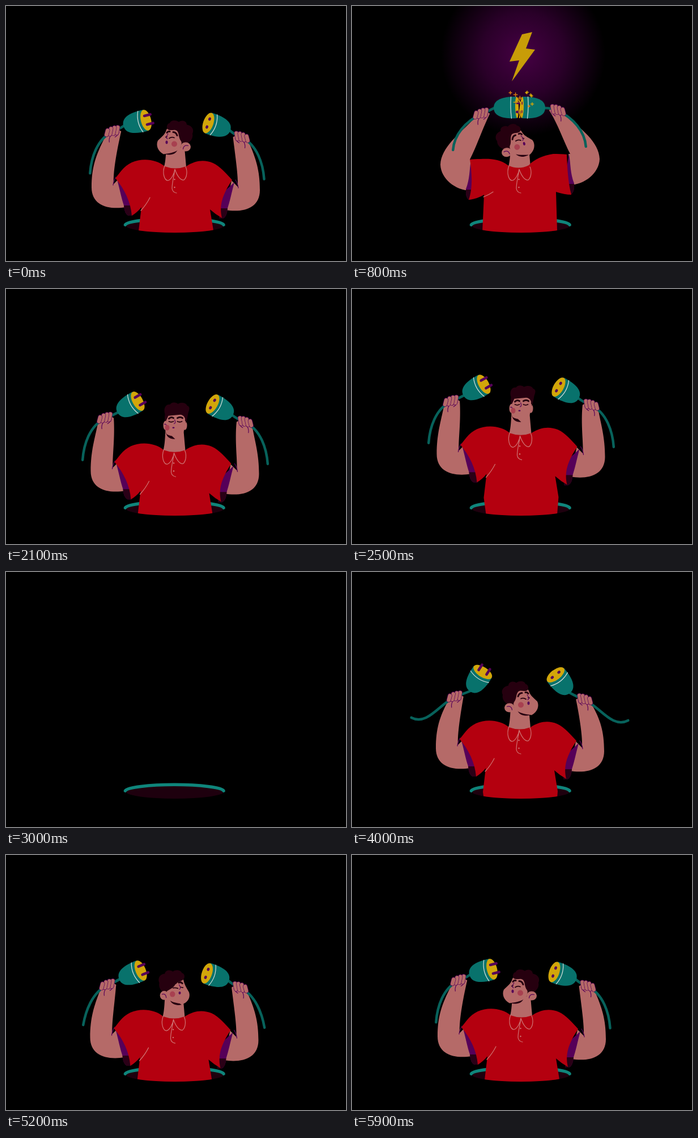
Animation of 600x450 px, one loop 6 s. Source, as an HTML page with a canvas:

```html
<!DOCTYPE html>
<html lang="en">
<head>
<meta charset="utf-8">
<title>Plugging in</title>
<style>
  html, body { margin: 0; width: 100%; height: 100%; overflow: hidden; background: #000; }
  canvas { display: block; }
</style>
</head>
<body>
<canvas id="stage" width="600" height="450"></canvas>
<script>
const ctx = document.getElementById('stage').getContext('2d');
const LOOP = 6000, STEP = 100;
const SKIN = '#b56a68', RED = '#b4000f', TEAL = '#08726c', CABLE = '#07625b', RIM = '#0f857b',
      YELLOW = '#d2a60a', PURPLE = '#560058', DARK = '#2a0016', HAIR = '#26000f', LINE = '#cf7575';

// Each pair holds the outlines for arms apart and plugs joined; arms and cuffs are mirrored for the right side.
const body = {
  shirt: ['M280 283 C265 270 240 268 222 276 C207 283 199 297 193 304 C209 323 220 345 222 370 Q232 364 239 355 L234 397 L244 470 L360 470 L366 396 L360 359 Q370 368 381 374 C375 350 384 330 399 307 C390 297 378 283 365 277 C350 271 335 272 318 283 Q299 290 280 283Z',
          'M278 281 C265 270 245 269 230 270 C222 270 216 270 211 271 C214 290 217 320 209 342 Q225 340 236 333 L233 400 L233 470 L366 470 L365 396 L363 328 Q378 333 390 333 C384 310 383 285 382 262 C375 261 365 261 358 261 C340 264 325 270 315 281 Q297 290 278 281Z'],
  seam: ['M254 338 Q248 350 238 361', 'M252 328 Q245 333 235 337'],
  forearm: ['M201 303 L190 314 C189 295 194 262', 'M214 271 L211 271 C222 250 234 215'],
  elbow: ['C158 264 151 285 151 320 C151 352 180 360 212 355Z', 'C192 226 160 250 159 280 C160 305 185 325 212 326Z'],
  cuff: ['M196 306 C201 325 204 340 208 352 Q209 367 216 370 L223 370 L222 330Z',
         'M213 271 C210 290 211 305 204 323 Q203 338 209 342 L215 341 L218 300Z']
};
const collar = 'M280 282 C275 296 280 308 286 308 C292 306 297 296 298 288 C302 300 308 308 314 307 C320 302 320 290 317 284 M298 289 C296 302 293 312 293 322 Q294 329 301 330';

// Each pair holds the front view and the view turned to the right.
const head = {
  beard: ['M280 250 Q281 267 297 266 Q312 267 313 250Z', 'M290 250 Q294 269 315 264 L304 250Z'],
  face: ['M283 220 C290 216 308 216 314 220 C315 230 315 240 313 249 C312 256 309 259 305 260 C298 262 288 261 283 258 C278 254 278 232 283 220Z',
         'M290 220 C300 216 310 216 312 221 C314 229 320 233 327 240 C331 248 327 259 317 264 C309 263 298 261 292 257 C284 254 282 235 290 220Z'],
  hair: ['M279 238 C279 234 278 228 279 222 C276 212 280 204 288 205 C291 200 299 201 302 204 C309 200 317 203 318 207 C325 209 321 217 320 220 C319 226 318 232 316 238 C315 230 314 224 306 223 L285 225Z',
         'M278 247 C270 243 264 236 266 228 C262 220 268 213 276 212 C276 205 285 203 290 207 C297 202 305 205 306 209 C313 211 312 220 308 221 C303 223 297 219 293 223 C289 228 291 235 286 241 L284 247Z'],
  brows: ['M286 230 Q290 226 294 229 M301 229 Q306 226 310 229', 'M293 231 Q295 225 300 225 M306 224 Q309 223 311 226'],
  eyes: ['M286 235 Q290 237 294 235 M301 235 Q305 237 309 235', 'M298 235 Q303 233 307 236 M311 233 Q312 233 313 234'],
  nose: ['M296 232 Q299 238 295 239', 'M309 228 Q314 235 310 237']
};

const lerp = (a, b, u) => a + (b - a) * u;
const random = seed => { const v = Math.sin(seed * 127.1) * 43758.5; return v - Math.floor(v); };

function ramp(t, from, to) {
  const u = Math.min(1, Math.max(0, (t - from) / (to - from)));
  return u * u * (3 - 2 * u);
}

// Rises from a to b and falls back from c to d.
const pulse = (t, a, b, c, d) => ramp(t, a, b) - ramp(t, c, d);

function morph([a, b], u) {
  const target = b.match(/[\d.]+/g);
  let i = 0;
  return a.replace(/[\d.]+/g, n => lerp(+n, +target[i++], u).toFixed(2));
}

// Dives with a small hop first, then springs back out of the hole.
function height(t) {
  const p = Math.min(1, Math.max(0, (t - 2200) / 710)), s = (t - 3600) / 1000;
  return s > 0 ? 300 * Math.exp(-8 * s) * Math.cos(7 * s) : 300 * (2.7 * p ** 3 - 1.7 * p ** 2);
}

function poseAt(t) {
  const dy = height(t), up = pulse(t, 200, 500, 1000, 1300);
  const yaw = 2 * ramp(t, 200, 500) - ramp(t, 1000, 1500) + ramp(t, 3500, 3700) - 2 * ramp(t, 5100, 5500) - 1;
  const swing = pulse(t, 3500, 3800, 3900, 4500);
  const kick = pulse(t, 1000, 1300, 1300, 1800) + pulse(t, 5100, 5400, 5400, 5700);
  return {
    dy, up, yaw, swing,
    lift: swing + .3 * kick,
    glow: pulse(t, 400, 600, 1000, 1200),
    squeeze: 1 - .42 * ramp(dy, 0, 120),
    lean: -1.5 * (1 + yaw),
    settle: 1.25 * (1 + yaw) * (1 - up)
  };
}

// Plug, hand and cable end of one side; side is -1 for left and 1 for right.
function limb({ up, yaw, swing, lift }, side) {
  const spread = 1 - Math.abs(yaw);
  const x = lerp(298.5 + side * (55 + 11 * spread + 10 * swing) - 3.5 * yaw, 295.5 + side * 4.5, up);
  const y = lerp(206.5 + 2.5 * (side + yaw) - 6 * spread - 20 * swing, 179, up);
  const tilt = lerp(16.5 + 13 * spread + 41 * swing - 2.5 * yaw * side, 1.5, up);
  const a = tilt * Math.PI / 180;
  const base = { x: x + side * 40 * Math.cos(a), y: y + 40 * Math.sin(a) };
  const hand = { x: base.x + side * (17.5 + tilt * .17 + 5 * up), y: base.y + 11 + side - 4 * up * (1 + side) };
  const tail = { x: hand.x + side * (40 + 10 * up + 40 * lift), y: hand.y + 74 - 10 * up - 40 * lift };
  return { side, x, y, a, base, hand, tail, lift };
}

function fill(path, color) {
  ctx.fillStyle = color;
  ctx.fill(new Path2D(path));
}

function line(path, color, width) {
  ctx.strokeStyle = color;
  ctx.lineWidth = width;
  ctx.stroke(new Path2D(path));
}

function oval(x, y, rx, ry, color) {
  ctx.fillStyle = color;
  ctx.beginPath();
  ctx.ellipse(x, y, rx, ry, 0, 0, 7);
  ctx.fill();
}

function group(draw) {
  ctx.save();
  draw();
  ctx.restore();
}

function drawGlow(glow) {
  ctx.globalAlpha = glow;
  const light = ctx.createRadialGradient(302, 85, 0, 302, 85, 145);
  light.addColorStop(0, '#460044');
  light.addColorStop(.5, '#2a0029');
  light.addColorStop(1, '#000');
  ctx.fillStyle = light;
  ctx.fillRect(150, 0, 300, 235);
  fill('M300 50 L318 46 L307 75 L323 77 L282 133 L295 96 L278 98Z', '#c89c08');
}

function drawSparks(glow, t) {
  ctx.globalAlpha = glow;
  let zigzag = 'M291 162';
  for (let i = 1; i < 8; i++) zigzag += `L${289 + random(t + i) * 9} ${162 + i * 5}`;
  line(zigzag, YELLOW, 2);
  for (let i = 0; i < 10; i++) {
    const x = 278 + random(t + i * 3) * 44, y = 152 + random(t + i * 7) * 28, r = 1 + random(i + 5) * 3;
    line(`M${x - r} ${y}h${2 * r}M${x} ${y - r}v${2 * r}`, i % 3 ? YELLOW : '#d87a10', 1.5);
  }
}

function drawPlug({ x, y, a, side }, up) {
  const rx = lerp(9, 3, up);
  ctx.translate(x, y);
  ctx.scale(-side, 1);
  ctx.rotate(-a);
  fill('M-41 0 C-41 -15 -24 -20 0 -19 L0 19 C-24 20 -41 15 -41 0Z', TEAL);
  line(`M-10 -19 Q${-9 - rx} 0 -10 19`, '#d5dfdc', 1.2);
  oval(0, 0, rx, 18.7, YELLOW);
  if (side < 0) line('M-1 -8 H10 M0 8 H11', PURPLE, 4.6);
  else for (const hole of [-7.5, 7.5]) oval(0, hole, rx * .26, 3, PURPLE);
}

function drawArm({ hand, side }, { up, lean, settle }) {
  const drop = side < 0 ? 0 : lerp(5, -10, up);
  const x = side < 0 ? hand.x - lean : 599 - hand.x + lean, y = hand.y - drop - settle;
  if (side > 0) {
    ctx.translate(599, drop);
    ctx.scale(-1, 1);
  }
  fill(morph(body.forearm, up) + ` ${x + 15} ${y} L${x + 4} ${y - 7} L${x - 13} ${y + 9} ` + morph(body.elbow, up), SKIN);
  if (up < .5) line('M189 316 Q190 308 194 302', PURPLE, 1.3);
  const cuff = new Path2D(morph(body.cuff, up));
  ctx.clip(cuff);
  ctx.fillStyle = PURPLE;
  ctx.fillRect(150, 250, 100, 150);
  ctx.fillStyle = DARK;
  ctx.fillRect(150, lerp(352, 324, up), 100, 60);
}

function drawCable({ base, hand, tail, side, lift }) {
  line(`M${base.x} ${base.y} Q${hand.x - side * 12} ${hand.y - 4} ${hand.x} ${hand.y}` +
       `C${hand.x + side * 28} ${hand.y + 14} ${tail.x - side * (2 + 28 * lift)} ${tail.y - 27 + 45 * lift} ${tail.x} ${tail.y}`, CABLE, 4.5);
}

function drawFingers({ hand, side }) {
  ctx.translate(hand.x, hand.y);
  ctx.scale(-side, 1);
  line('M-4 8 Q-7 13 -6 19 M4 10 Q8 8 11 2', PURPLE, 1.2);
  for (let i = 0; i < 4; i++) {
    const finger = `M${9 - i * 6} ${-7 + i * i * .6} L${7 - i * 6} ${3 + i}`;
    line(finger, PURPLE, 8);
    line(finger, SKIN, 6.6);
  }
}

function drawHead(yaw, tilt) {
  const u = Math.abs(yaw), shape = name => morph(head[name], u);
  ctx.translate(299 + tilt * .23, 259.5 - tilt * .42);
  ctx.scale(yaw < 0 ? -1 : 1, 1);
  ctx.rotate(tilt * Math.PI / 180);
  ctx.translate(-296, -262);
  oval(lerp(314, 305, u), 242, 4, 8, SKIN);
  fill(shape('beard'), HAIR);
  fill(shape('face'), SKIN);
  fill(shape('hair'), HAIR);
  const x = lerp(280, 278, u), y = lerp(242, 251, u), w = lerp(4, 9, u);
  oval(x, y, w, 8, SKIN);
  line(`M${x - w * .5} ${y - 2} Q${x + w * .4} ${y - 4} ${x + w * .5} ${y + 4}`, PURPLE, 1.2);
  oval(lerp(283, 298, u), 246, lerp(4, 5, u), 5, '#a84050');
  line(shape('brows'), HAIR, 3);
  line(shape('eyes'), HAIR, 1.8);
  line(shape('nose'), PURPLE, 1.2);
  oval(lerp(294, 311.5, u), lerp(246, 243, u), 2, lerp(1.3, 3, u), PURPLE);
}

function drawMan(pose) {
  const { up, lean, settle, yaw } = pose;
  const limbs = [limb(pose, -1), limb(pose, 1)];
  group(() => {
    ctx.translate(lean, settle);
    for (const one of limbs) group(() => drawArm(one, pose));
    fill('M283 248 C282 262 282 272 279 284 L298 298 L318 284 L315 250Z', SKIN);
    fill(morph(body.shirt, up), RED);
    line(morph(body.seam, up), LINE, 1.2);
    line(collar, LINE, 1.2);
    for (const y of [306, 320]) oval(297.5, y, 1.2, 1.2, LINE);
    drawHead(yaw, -13 * up);
  });
  for (const one of limbs) {
    drawCable(one);
    group(() => drawPlug(one, up));
    group(() => drawFingers(one));
  }
}

function draw(t) {
  const pose = poseAt(t);
  ctx.fillStyle = '#000';
  ctx.fillRect(0, 0, 600, 450);
  ctx.lineCap = ctx.lineJoin = 'round';
  group(() => drawGlow(pose.glow));
  oval(298, 388, 86, 12, '#1e000e');
  line('M210.5 386 A87 11.5 0 0 1 384 386', RIM, 5.5);
  if (pose.dy < 290) group(() => {
    ctx.clip(new Path2D('M0 0 H600 V388 H384 A86 12 0 0 1 212 388 H0Z'));
    ctx.translate(297, pose.dy);
    ctx.scale(pose.squeeze, 1);
    ctx.translate(-297, 0);
    drawMan(pose);
  });
  group(() => drawSparks(pose.glow, t));
}

function tick() {
  draw(Math.floor(performance.now() % LOOP / STEP) * STEP);
  requestAnimationFrame(tick);
}
tick();
</script>
</body>
</html>
```
